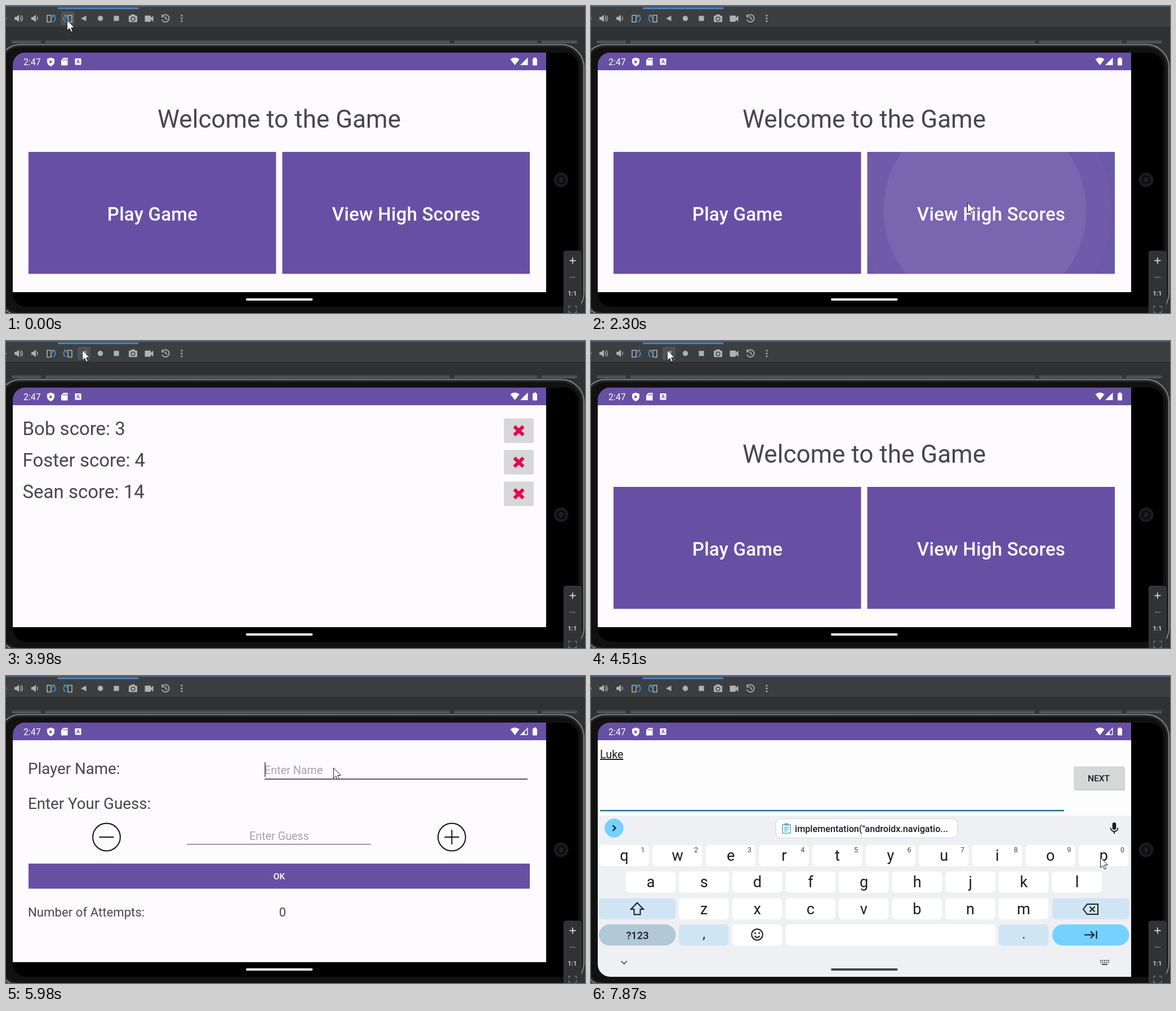
Write an HTML page that moves like this. It is 1028x545 px and loops after 7.99 s.

```html
<!DOCTYPE html>
<html lang="en">
<head>
<meta charset="utf-8">
<title>Guessing game</title>
<style>
  html, body { margin: 0; width: 100%; height: 100%; overflow: hidden; background: #2f3133; }
  svg { display: block; width: 100%; height: 100%; font-family: Roboto, "Noto Sans", sans-serif; }
  .line { fill: none; stroke: currentColor; }
</style>
</head>
<body>
<svg id="stage" viewBox="0 0 1028 545"></svg>
<script>
const LOOP = 7990;
const PURPLE = '#6750a4', INK = '#49454f', GREY = '#afb1b3', BLUE = '#3a94cf', DARK = '#1b1b1f';
const PAPER = '#fefbff', KEY_BLUE = '#d0e5f3', SKY = '#76d1ff';

// Markup helpers
const rect = (x, y, w, h, fill, r = 0, more = '') =>
  `<rect x="${x}" y="${y}" width="${w}" height="${h}" rx="${r}" fill="${fill}" ${more}/>`;
const dot = (x, y, r, fill, more = '') => `<circle cx="${x}" cy="${y}" r="${r}" fill="${fill}" ${more}/>`;
const path = (d, fill, more = '') => `<path d="${d}" fill="${fill}" ${more}/>`;
const line = (d, color, w = 2, more = '') => `<path class="line" d="${d}" color="${color}" stroke-width="${w}" ${more}/>`;
const text = (s, x, y, size, fill, more = '') =>
  `<text x="${x}" y="${y}" font-size="${size}" fill="${fill}" ${more}>${s}</text>`;
const mid = (s, x, y, size, fill, more = '') => text(s, x, y, size, fill, 'text-anchor="middle" ' + more);
const group = (id, body, more = '') => `<g id="${id}" ${more}>${body}</g>`;
const BOLD = 'font-weight="500"';

function toolbar() {
  const speaker = x => path(`M${x - 7} 19.5h3l5-4v13l-5-4h-3z`, GREY);
  const phone = x => line(`M${x} 16.5h7v12h-7z`, GREY, 1.6);
  return rect(0, 0, 1028, 37.5, '#3c3f41') + rect(0, 0, 1028, 1, '#5a7aa2') +
    rect(92, 2.5, 143, 3, '#4a88c7') + rect(0, 37.5, 1028, 1, '#2a2b2c') +
    rect(97, 10, 25, 24, '#4e5254', 4, 'id="hoverRotate"') +
    rect(127, 10, 23, 24, '#4e5254', 4, 'id="hoverBack"') +
    dot(-1, 22, 2, GREY) + speaker(22) + line('M25 19q2.5 3 0 6M26.5 16.5q6 5.500 0 11', GREY, 1.4) +
    speaker(52) + line('M55 19q2.5 3 0 6', GREY, 1.4) +
    phone(73) + line('M83 28c6-2 6-9 1-11M83 21v-4.5h4', BLUE, 1.8) +
    phone(110) + line('M107 28c-6-2-6-9-1-11M107 21v-4.5h-4', BLUE, 1.8) +
    path('M133 22l9.5-5v10z', GREY) + dot(167.5, 22, 4.7, GREY) + rect(191.5, 17.5, 9, 9, GREY) +
    rect(218, 17, 15, 11.5, GREY, 1.5) + rect(222, 15, 7, 4, GREY, 1) +
    dot(225.5, 22.7, 3.3, GREY, 'stroke="#3c3f41" stroke-width="1.5"') +
    rect(246.5, 17, 10.5, 11, GREY, 1) + path('M257 21l4.5-4v11l-4.5-4z', GREY) +
    line('M278 18a6.5 6.5 0 1 1-1 6M277 15v4.5h4.5M283.5 18.5v4l3 1.5', GREY, 1.7) +
    [17, 22, 27].map(y => dot(312, y, 1.6, GREY)).join('');
}

function device() {
  return rect(10, 60, 1004, 6, 'url(#edge)', 3) +
    [62, 788, 943].map(x => rect(x, 60, 8, 6, '#353535')).join('') +
    rect(-14, 68.5, 1040, 481, '#111', 40, 'stroke="#858585" stroke-width="2"') +
    rect(-11, 71.5, 1034, 475, 'none', 37, 'stroke="#242424" stroke-width="3"') +
    rect(12, 83, 1004, 451, '#000', 24) +
    dot(985.5, 308.5, 13, '#1b1b1d') + dot(985.5, 308.5, 8, '#0c0d11') +
    dot(985.5, 308.5, 4.5, '#161c26') + dot(985.5, 305.5, 1, '#2b4660') + dot(985.5, 311.5, 1, '#2b4660');
}

function zoomPanel() {
  return rect(990.5, 435, 30.5, 120, '#303234', 4, 'stroke="#3c3e40"') +
    line('M1000.5 452h11M1006 446.5v11', '#c4c6c8', 2) + line('M1000.5 481.5h11', '#6c6e70', 1.6) +
    mid('1:1', 1005.5, 513.5, 11.5, '#c4c6c8', 'font-weight="700"') +
    line('M1003 533h-4v4M1009 533h4v4M1003 544h-4v-4M1009 544h4v-4', '#6c6e70', 1.5);
}

function statusBar() {
  const white = '#fff';
  return rect(12, 82.5, 947, 31.5, PURPLE) + text('2:47', 31, 105, 16, white) +
    path('M79.5 91.5l6.5 2.5v5q0 5-6.5 8-6.5-3-6.5-8v-5z', white) + path('M77.5 96v6.5l5-3.2z', PURPLE) +
    path('M102 92h7.5v13.5h-11.5v-9z', white) + line('M102.5 94v3M105 94v3M107.5 94v3', PURPLE, 1.1) +
    rect(122.5, 93, 11, 11.5, white, 1) + mid('A', 128, 102.2, 9, PURPLE, 'font-weight="700"') +
    path('M903.5 105l-8-10.5q8-6 16 0z', white) + path('M913 105l13.5-13.5v13.5z', white, 'id="signal"') +
    group('weakSignal', path('M913 105l8-8v8z', white) + line('M914.5 104.3l11.3-11.3v11.3z', white, 1.4)) +
    rect(935, 93, 8, 12.5, white, 1.3) + rect(937, 91.5, 4, 2.5, white);
}

function home() {
  const button = (x, label) => rect(x, 259, 439.5, 216.5, PURPLE) +
    '<g class="ripple" clip-path="url(#buttons)"></g>' +
    mid(label, x + 220, 380.5, 33, '#fff', BOLD + ' letter-spacing=".24"');
  return mid('Welcome to the Game', 485, 216, 44, INK) + button(40, 'Play Game') + button(490.5, 'View High Scores');
}

function scoreList() {
  const rows = [['Bob', 3], ['Foster', 4], ['Sean', 14]];
  return rows.map(([name, score], i) => {
    const y = 56 * i;
    return text(`${name} score: ${score}`, 29.5, 167 + y, 33, INK) +
      rect(884, 137.5 + y, 53, 43.5, '#d6d7d7', 2) +
      line(`M902.5 ${151.5 + y}l16 15.5M918.5 ${151.5 + y}l-16 15.5`, '#e6004f', 6);
  }).join('');
}

function game() {
  const ring = x => dot(x, 286, 24.4, 'none', 'stroke="#111" stroke-width="2"') + line(`M${x - 13} 286h26`, '#111', 2);
  const hint = '#a5a3a8';
  return text('Player Name:', 39, 174, 27.7, INK) + text('Enter Your Guess:', 39, 236, 27.7, INK) +
    text('Enter Name', 459, 174, 19.8, hint) + mid('Enter Guess', 485, 291, 19.8, hint) +
    rect(459, 182, 467, 1, '#77747c', 0, 'id="nameLine"') + rect(459, 153, 1.8, 26, '#5a5470', 0, 'id="caret"') +
    rect(321, 298, 327, 1.3, '#6b6870') +
    ring(178.5) + ring(791.5) + line('M791.5 273v26', '#111', 2) +
    rect(40, 333, 890, 44.5, PURPLE) + mid('OK', 485, 361, 15.5, '#fff', BOLD) +
    text('Number of Attempts:', 39, 427, 22.2, INK) + mid('0', 491, 427, 22.2, INK);
}

function keyboard() {
  const PITCH = 94.6;
  const key = (x, y, w, fill = '#fff', r = 6) => rect(x, y, w, 37.5, fill, r);
  const rows = [['QWERTYUIOP', 14.5, 300], ['ASDFGHJKL', 61.7, 347], ['ZXCVBNM', 156, 394.5]];
  let caps = '', small = '', keys = '';
  rows.forEach(([letters, x0, y], row) => [...letters].forEach((c, i) => {
    const x = x0 + i * PITCH;
    keys += key(x, y, 88.5);
    if (!row) keys += mid((i + 1) % 10, x + 77.5, 313, 12.5, '#46474a');
    caps += mid(c, x + 44.5, y + 29.5, 27, DARK);
    small += mid(c.toLowerCase(), x + 44.5, y + 28, 27, DARK);
  }));
  const shift = 'M82 402.5l-11 11.5h5.5v9.5h11v-9.5h5.5z';
  caps += path(shift, DARK);
  small += line(shift, DARK, 2);

  const extract = rect(12, 114, 947, 134, '#fdfdfe') + text('', 16, 146, 19.8, DARK, 'id="typed"') +
    rect(59, 126, 1.6, 24, '#1a6ea0', 0, 'id="typeCaret"') +
    rect(16, 237.7, 824, 2.5, '#1a6ea0') + rect(858, 162, 90, 41, '#c9c9ca', 2) +
    rect(857, 160.5, 90, 40.5, '#d6d7d7', 2) + mid('NEXT', 901.5, 186.5, 15.5, DARK, BOLD);
  const strip = dot(41, 270, 16.7, SKY) + line('M38.5 265l5 5-5 5', DARK, 2.2) +
    rect(328, 253.5, 323, 34, '#fff', 9, 'stroke="#d3d5d9"') +
    line('M340 264h14v15h-14zM343 269h8M343 272h8M343 275h5', '#4fa9d8', 1.5) + rect(343.5, 261.5, 7, 4, '#4fa9d8', 1) +
    text('implementation("androidx.navigatio...', 362, 277, 16.2, DARK, BOLD) +
    rect(925.7, 260, 6.6, 13, DARK, 3.3) + line('M922.5 269.5a6.5 6.5 0 0 0 13 0M929 276v4', DARK, 2);
  const specials = key(14, 394.5, 136.5, KEY_BLUE) + key(819, 394.5, 136.5, KEY_BLUE) +
    key(14, 441, 136.5, '#b1c8d6', 18.7) + key(156, 441, 88.5, KEY_BLUE) + key(250.6, 441, 88.5) +
    key(345.5, 441, 373) + key(724, 441, 88.5, KEY_BLUE) + key(819, 441, 136.5, SKY, 18.7) +
    line('M881 405h19v18h-19l-7-9zM885.5 409.5l9 9M894.5 409.5l-9 9', DARK, 2) +
    mid('?123', 82.5, 466.5, 18.3, DARK, BOLD) + mid(',', 200.5, 466, 24, DARK) + mid('.', 768.5, 466, 24, DARK) +
    dot(295, 459, 9.8, 'none', `stroke="${DARK}" stroke-width="2"`) + dot(291.5, 456.5, 1.5, DARK) +
    dot(298.5, 456.5, 1.5, DARK) + line('M290.5 461.5q4.5 5.5 9 0', DARK, 2) +
    line('M876 459.5h16M887 453.5l6 6-6 6M897.5 452.5v14', DARK, 2.1);
  const dots = [505, 508.5].map(y => line(`M904 ${y}h16`, '#444', 2, 'stroke-dasharray="2 1.5"')).join('');
  const nav = rect(426, 519, 118.5, 4, '#444', 2) + line('M53.5 506l5.2 5 5.2-5', '#444', 1.7) +
    dots + line('M907 512h10', '#444', 2);
  return extract + rect(12, 248, 947, 287, '#eff0f3') + strip + keys + specials +
    group('caps', caps) + group('small', small) + group('nav', nav);
}

document.getElementById('stage').innerHTML =
  `<defs>
    <linearGradient id="edge" x2="0" y2="1"><stop stop-color="#3a3a3a"/><stop offset="1" stop-color="#606060"/></linearGradient>
    <clipPath id="screen"><path d="M959 82.5V534H34a22 22 0 0 1-22-22V104.5a22 22 0 0 1 22-22z"/></clipPath>
    <clipPath id="buttons"><path d="M40 259h439.5v216.5h-439.5zM490.5 259h439.5v216.5h-439.5z"/></clipPath>
  </defs>` +
  rect(0, 0, 1028, 545, '#2f3133') + toolbar() + device() +
  group('view', statusBar() + rect(12, 114, 947, 394, PAPER) + group('home', home()) +
    group('list', scoreList()) + group('game', game()) + rect(426, 519, 118.5, 4, '#fff', 2) +
    group('keyboard', keyboard()), 'clip-path="url(#screen)"') +
  zoomPanel() +
  path('M0 0V18.5L4.3 14.6 7 21 9.8 19.8 7.2 13.5H13Z', '#fff', 'id="cursor" stroke="#1c1c1c"');

// Screen refreshes: [first, last, count]
const bursts = [[0, 0, 1], [1040, 1160, 2], [1310, 1550, 3], [1720, 1720, 1], [1870, 1870, 1], [2030, 2030, 1],
  [2180, 2540, 4], [3060, 3540, 5], [3680, 3980, 3], [4510, 4510, 1], [4650, 4650, 1], [4800, 4800, 1],
  [4950, 5560, 6], [5710, 5710, 1], [5860, 5980, 2], [6400, 7120, 7], [7390, 7870, 5]];
const steps = bursts.flatMap(([a, b, n]) => Array.from({ length: n }, (_, i) => a + (b - a) * i / Math.max(1, n - 1)));

// Pointer path: [time, x, y]
const route = [[0, 108, 25], [900, 108, 25], [1160, 122, 114], [1550, 227, 340], [1720, 228, 341], [1870, 645, 349],
  [2030, 668, 349], [2940, 668, 349], [3060, 602, 344], [3420, 110, 40], [3540, 134, 4], [3680, 133, 0],
  [3830, 134, 15], [3980, 135, 16], [4510, 135, 16], [4650, 140, 29], [4800, 325, 340], [5316, 325, 340],
  [5560, 551, 208], [5710, 581, 163], [7270, 581, 163], [7870, 904, 322], [LOOP, 904, 322]];

const clamp = v => Math.min(1, Math.max(0, v));
const mix = (a, b, k) => a + (b - a) * k;
const $ = id => document.getElementById(id);
const show = (id, on) => { $(id).style.display = on ? '' : 'none'; };

function pointer(t) {
  const i = route.findIndex(p => p[0] > t);
  const [t0, x0, y0] = route[i - 1], [t1, x1, y1] = route[i];
  const k = (t - t0) / (t1 - t0);
  return [mix(x0, x1, k), mix(y0, y1, k)];
}

// A press wave that drifts from the pointer to the button's centre
const ripples = document.querySelectorAll('.ripple');
function ripple(index, age, x, y) {
  const cx = [260, 710][index], k = clamp(age / 240);
  const px = mix(x, cx, k), py = mix(y, 367, k);
  ripples[index].innerHTML = age > 0 && age < 420
    ? rect(cx - 220, 259, 440, 217, '#fff', 0, 'opacity=".04"') +
      dot(px, py, age * 1.25, '#fff', 'opacity=".02"') + dot(px, py, age, '#fff', 'opacity=".065"')
    : '';
}

function draw(now) {
  const time = now % LOOP;
  const t = steps.filter(s => s <= time).pop();
  const [x, y] = pointer(t);
  $('cursor').setAttribute('transform', `translate(${Math.round(x) + .5} ${Math.round(y)})`);
  show('hoverRotate', t < 1040);
  show('hoverBack', t >= 3830 && t < 4800);

  const inList = t >= 2540 && t < 4510, inGame = t > 5300;
  show('home', !inList && !inGame);
  show('list', inList);
  show('game', inGame);
  show('signal', !inGame);
  show('weakSignal', inGame);
  ripple(1, t - 2120, x, y);
  ripple(0, t - 4890, x, y);

  const focused = t >= 5860;
  $('nameLine').setAttribute('height', focused ? 2 : 1);
  $('nameLine').setAttribute('fill', focused ? '#5a5470' : '#77747c');
  show('caret', t >= 5980);

  // The keyboard rises, then the name is typed
  const rise = clamp((t - 6340) / 360);
  show('keyboard', rise > 0);
  $('keyboard').style.opacity = clamp(rise * 2.5);
  $('keyboard').setAttribute('transform', `translate(0 ${290 * (1 - rise) ** 3})`);
  const name = 'Luke'.slice(0, t < 6870 ? 0 : t < 7390 ? Math.floor((t - 6750) / 120) : 4);
  $('typed').textContent = name || 'Enter Name';
  $('typed').setAttribute('fill', name ? DARK : '#a5a3a8');
  $('typed').setAttribute('text-decoration', name ? 'underline' : 'none');
  show('typeCaret', t >= 7390 && t < 7740);
  show('caps', t < 7390);
  show('small', t >= 7390);
  $('nav').style.opacity = mix(.25, 1, clamp((t - 7120) / 390));
  requestAnimationFrame(draw);
}
requestAnimationFrame(draw);
</script>
</body>
</html>
```
